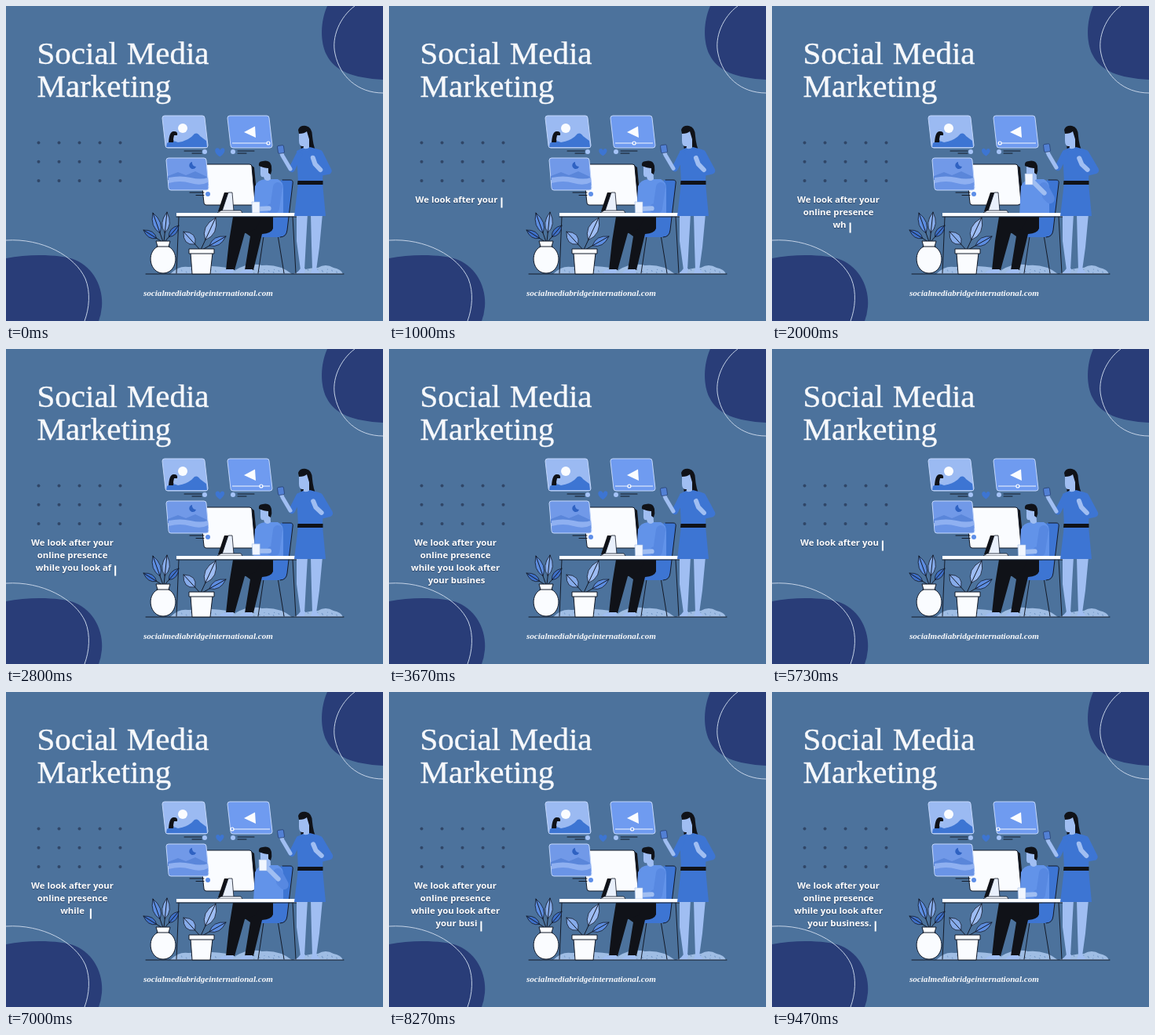
Animation, 480 px wide and 402 px high, one loop 9540 ms. Source, as an HTML page:

```html
<!DOCTYPE html>
<html lang="en">
<head>
<meta charset="utf-8">
<title>Social Media Marketing</title>
<style>
html, body { margin: 0; width: 100%; height: 100%; overflow: hidden; background: #4c729c; }
svg { display: block; width: 480px; height: 402px; }
.title { font: 41px "Liberation Serif", "Times New Roman", serif; word-spacing: 1.5px;
  fill: #f6f8fb; stroke: #f6f8fb; stroke-width: .4; }
.url { font: italic bold 11.1px "Liberation Serif", "Times New Roman", serif; fill: #f6f8fb; }
.type { font: bold 11.35px "Noto Sans", "Open Sans", sans-serif; fill: #fff; text-anchor: middle;
  white-space: pre; text-shadow: 0 1px 1px #2b4264; }
.ink { fill: #101218; }
.white { fill: #fafcff; }
.skin { fill: #a0bef2; }
.blue { fill: #3d75d3; }
.shirt { fill: #6293e9; }
.deep { fill: #2f62c2; }
.card { stroke: #c3d7fb; stroke-width: 1; stroke-linejoin: round; }
.line { fill: none; stroke: #131a28; stroke-width: 1; stroke-linecap: round; stroke-linejoin: round; }
.limb { fill: none; stroke-linecap: round; stroke-linejoin: round; }
</style>
</head>
<body>
<svg viewBox="0 0 480 402">
  <rect width="480" height="402" fill="#4c729c"/>

  <g fill="#293d78">
    <path d="M409 0C400 20 400 46 408 62C418 83 442 92 480 94V0Z"/>
    <path d="M0 322C30 316 70 317 88 324C112 334 124 360 122 384Q121 394 118 402H0Z"/>
  </g>
  <g fill="none" stroke="#c4d2e6">
    <path d="M444 0C425 14 414 40 419 61C425 90 448 111 480 111"/>
    <path d="M0 299C46 296 88 319 101 348C108 365 106 386 100 402"/>
  </g>
  <g id="dots" fill="#304667"></g>

  <g class="title">
    <text x="39.500" y="74">Social Media</text>
    <text x="39.500" y="115.500">Marketing</text>
  </g>
  <text class="url" x="175" y="370">socialmediabridgeinternational.com</text>

  <!-- ground -->
  <g fill="#9fbde4">
    <path d="M209 342Q220 331 232 333L262 332Q283 333 292 337Q309 327 326 331Q348 329 364 342Z"/>
    <path d="M366 342Q381 334 397 334Q407 328 417 334Q427 336 429 342Z"/>
  </g>
  <g id="specks" fill="#6d91c2"></g>
  <path class="line" d="M178 342H430" stroke-width="1.4"/>

  <!-- monitor -->
  <path d="M312 203L316 206L320 250L315 254" class="ink"/>
  <path d="M252 202H310Q313 202 313 205L317 250Q317 254 313 254H255Q252 254 252 251L247 206Q247 202 252 202Z" fill="#fafcff" stroke="#131a28"/>
  <path class="ink" d="M278 238H285L277 262H270Z"/>
  <path d="M283 238H288L290 262H275Z" fill="#e9f0fc" stroke="#131a28" stroke-width=".8"/>

  <!-- floating cards -->
  <path class="card" fill="#9bbaf2" d="M202 140H250Q253 140 253 143L257 178Q257 181 254 181H206Q203 181 203 178L199 143Q199 140 202 140Z"/>
  <circle class="white" cx="225" cy="156" r="6"/>
  <path class="blue" d="M204 180L205 175Q211 170 219 174Q233 172 240 163Q244 161 247 166L255 172L256 180Z"/>
  <path class="ink" d="M207 174Q208 159 214 160Q219 160 218 165L214 166L213 174Z"/>
  <path class="skin" d="M214 165L218.500 165L218 170L213 171Z"/>

  <path class="card" fill="#6f9bf0" d="M285 140H332Q335 140 335 143L339 178Q339 181 336 181H289Q286 181 286 178L282 143Q282 140 285 140Z"/>
  <path class="white" d="M303 161L317 153.500L318 168Z"/>
  <path d="M288 175H336" stroke="#f4f8ff" stroke-width="1.2"/>
  <circle id="knob" cy="175" r="2" fill="#6f9bf0" stroke="#fff" stroke-width="1.2"/>

  <path class="card" fill="#7199e8" d="M207 194H252Q255 194 255 197L258 232Q258 235 255 235H210Q207 235 207 232L204 197Q204 194 207 194Z"/>
  <path fill="#5a86da" d="M206 217L219 212L229 216L241 211L256 218V222H206Z"/>
  <path fill="#8fb0f1" d="M207 219Q222 216 235 219T257 219L258 229H207Z"/>
  <path fill="#6a94e6" d="M207 226Q222 222 235 226T257 225V234H208Z"/>
  <path class="deep" d="M237 199A4.500 4.500 0 1 0 242 205A5 5 0 0 1 237 199Z"/>

  <path class="line" d="M227 185H249M237 188H249M295 185H316M295 188H306M234 238H252M242 241.500H252"/>
  <g fill="#a5c3f7">
    <circle cx="253" cy="186" r="3"/><circle cx="289" cy="186" r="3"/>
  </g>
  <circle cx="257" cy="240" r="3" fill="#5d8ee8"/>
  <path id="heart" fill="#3d75d2" d="M0 5.500C-9 0 -6 -6 -2.500 -5Q-.5 -4.500 0 -2.500Q1 -5 3 -5C7 -5 7 1 0 5.500Z"/>

  <!-- chair and man -->
  <path class="line" d="M328 294L321 341M346 292L354 341" stroke-width="3"/>
  <path class="blue" d="M350 222H362Q366 222 365 227L358 286Q357 295 349 295H322V270H344Z"/>
  <path class="line" d="M352 222H362Q366 222 365 227L358 286Q357 295 349 295" stroke-width="1.8"/>
  <path class="ink" d="M300 269H340V284Q338 290 326 291L315 337H304L311 294L300 286Z"/>
  <path class="ink" d="M289 269H326L318 285L304 290L291 337H280L284 300Z"/>
  <path class="skin" d="M281 336H290L289 341H271Q273 337 281 336ZM305 336H314V341H297Q299 337 305 336Z"/>
  <path class="shirt" d="M317 230Q320 222 330 221L346 221Q353 224 353 233V268H315Z"/>
  <path class="skin" d="M324 205L336 203L337 221Q333 225 329 221L328 218Q324 219 324 214Z"/>
  <path class="ink" d="M322 204Q321 198 327 198Q336 196 338 204Q339 210 337 215L334 213V207Q329 207 322 204Z"/>

  <!-- desk -->
  <path id="sleeve" class="limb" stroke="#5788e1" stroke-width="12"/>
  <path id="forearm" class="limb" stroke="#a0bef2" stroke-width="6"/>
  <path id="cup" d="M-5 -7H5V7H-4.500Z" fill="#f1f6ff" stroke="#9eb9e4" stroke-width=".6"/>
  <path d="M269 264L274 261H299L301 264Z" fill="#f4f8ff" stroke="#131a28" stroke-width=".8"/>
  <path class="line" d="M220 269L217 341M365 269L369 341" stroke-width="2.200"/>
  <rect class="white" x="217" y="264" width="154" height="4.500"/>
  <path class="line" d="M217 269H371V264" stroke-width="1.300"/>

  <!-- woman -->
  <path class="skin" d="M370 265H384L382 300L380 337H375L370 300ZM388 265H403L399 308L395 337H390L389 305Z"/>
  <path class="skin" d="M375 335H381L380 341H370ZM390 335H395L400 341H388Z"/>
  <path class="ink" d="M372 158Q374 152 382 153Q390 155 390 166Q391 177 394 184L376 184L373 163Z"/>
  <path class="skin" d="M373 163Q380 163 383 160L386 170V183Q382 187 378 183L379 179Q373 180 373 172Z"/>
  <path class="blue" d="M370 185L378 181Q382 184 387 180L398 183Q404 186 404 196L403 226L407 268H367L372 226Z"/>
  <path class="ink" d="M371.500 223H403.500V228H371Z"/>
  <g id="phoneArm">
    <path class="limb" stroke="#3d75d3" stroke-width="8" d="M373 189L364 207"/>
    <path class="limb" stroke="#a0bef2" stroke-width="5" d="M362 207L352 190L350 185"/>
    <rect x="346" y="177" width="8" height="10" rx="1.500" fill="#5280d4" stroke="#223a6b" stroke-width=".7" transform="rotate(-8 350 182)"/>
  </g>
  <g id="restArm">
    <path class="limb" stroke="#3d75d3" stroke-width="9" d="M399 188L411 210L402 212"/>
    <path class="limb" stroke="#a0bef2" stroke-width="6" d="M401 209L394 202L391 194"/>
  </g>

  <!-- plants -->
  <g id="leaves"></g>
  <path d="M191 300H209L207 307C222 315 217 341 200 341S178 315 193 307Z" fill="#fafcff" stroke="#131a28"/>
  <path class="line" d="M192 307H208" stroke-width=".8"/>
  <path d="M235 315H263L260 342H237Z" fill="#fafcff" stroke="#131a28"/>
  <path d="M233 310H265V316H233Z" fill="#fafcff" stroke="#131a28"/>

  <text class="type" x="86" y="251"></text>
  <text class="type" x="86" y="267"></text>
  <text class="type" x="86" y="283"></text>
  <text class="type" x="86" y="299"></text>
  <rect id="caret" width="2" height="13" fill="#fff"/>
</svg>
<script>
const $ = id => document.getElementById(id);
const set = (id, name, value) => $(id).setAttribute(name, value);

const LOOP = 9540, CYCLE = LOOP / 2, STEP = 1000 / 15, RATE = 18.6;
const LINES = ['We look after your ', 'online presence ', 'while you look after ', 'your business.'];
const rows = [...document.querySelectorAll('.type')];

let dots = '';
for (let r = 0; r < 3; r++)
  for (let c = 0; c < 5; c++)
    dots += `<circle cx="${41.5 + c * 26}" cy="${174.5 + r * 24.3}" r="2"/>`;
$('dots').innerHTML = dots;

let specks = '';
for (let i = 0; i < 70; i++) {
  const x = 218 + (i * 61.8) % 204;
  if (x > 296 && x < 306 || x > 355 && x < 376) continue;
  specks += `<circle cx="${x}" cy="${336 + (i * 2.7) % 5}" r=".6"/>`;
}
$('specks').innerHTML = specks;

// base x, y, tip x, y, half width, colour
const leaves = [
  [199, 301, 175, 286, 5, '#3f70c8'], [200, 301, 187, 264, 6, '#5d8de0'],
  [201, 301, 205, 263, 6, '#86abea'], [202, 301, 220, 280, 5, '#3f70c8'],
  [247, 311, 226, 288, 8, '#86abea'], [248, 311, 267, 270, 8, '#9dbcf3'],
  [250, 311, 280, 294, 6, '#5d8de0']
];
$('leaves').innerHTML = leaves.map(([x, y, tx, ty, w, fill]) => {
  const dx = tx - x, dy = ty - y, len = Math.hypot(dx, dy);
  const sx = x + dx * .3, sy = y + dy * .3, mx = x + dx * .6, my = y + dy * .6;
  const nx = -dy / len * w * 1.6, ny = dx / len * w * 1.6;
  return `<path d="M${sx} ${sy}Q${mx + nx} ${my + ny} ${tx} ${ty}Q${mx - nx} ${my - ny} ${sx} ${sy}Z"
    fill="${fill}" stroke="#131a28" stroke-width=".8"/>
    <path class="line" d="M${x} ${y}L${tx} ${ty}"/>`;
}).join('');

const clamp = v => Math.min(1, Math.max(0, v));
const ease = v => (v = clamp(v), v * v * (3 - 2 * v));
const mix = (a, b, k) => a + (b - a) * k;

function typeText(t) {
  let left = Math.floor(t / 1000 * RATE), row = 0;
  LINES.forEach((line, i) => {
    const shown = line.slice(0, Math.max(0, left));
    if (rows[i].textContent !== shown) rows[i].textContent = shown;
    if (shown) row = i;
    left -= line.length;
  });
  const blink = t % 600;
  set('caret', 'x', 86 + rows[row].getComputedTextLength() / 2 + 4);
  set('caret', 'y', 244.5 + row * 16);
  set('caret', 'opacity', blink > 185 && blink < 515 ? 1 : 0);
}

function drink(t) {
  const k = ease((t - 1450) / 450) - ease((t - 2400) / 450);
  const ex = mix(342, 354, k), ey = mix(258, 246, k);
  const hx = mix(321, 333, k), hy = mix(259, 225, k);
  set('sleeve', 'd', `M346 231L${ex} ${ey}L${mix(ex, hx, .2)} ${mix(ey, hy, .2)}`);
  set('forearm', 'd', `M${mix(ex, hx, .35)} ${mix(ey, hy, .35)}L${hx} ${hy}`);
  set('cup', 'transform', `translate(${mix(318, 327, k)} ${mix(257, 221, k)})`);
}

function draw(time) {
  const t = Math.floor((time % LOOP + 4) / STEP) * STEP % CYCLE;
  typeText(t);
  drink(t);
  set('knob', 'cx', 288 + 46 * clamp(1 - t % (CYCLE / 2) / 2100));
  const beat = t % (CYCLE / 4) / (CYCLE / 4);
  set('heart', 'transform', `translate(272.5 186.5) scale(${1.05 - .2 * beat})`);
  const sway = Math.cos(t / CYCLE * 2 * Math.PI);
  set('phoneArm', 'transform', `translate(0 ${sway})`);
  set('restArm', 'transform', `rotate(${sway * 2} 399 188)`);
}

const start = performance.now();
function tick() {
  draw(performance.now() - start);
  requestAnimationFrame(tick);
}
tick();
</script>
</body>
</html>
```
